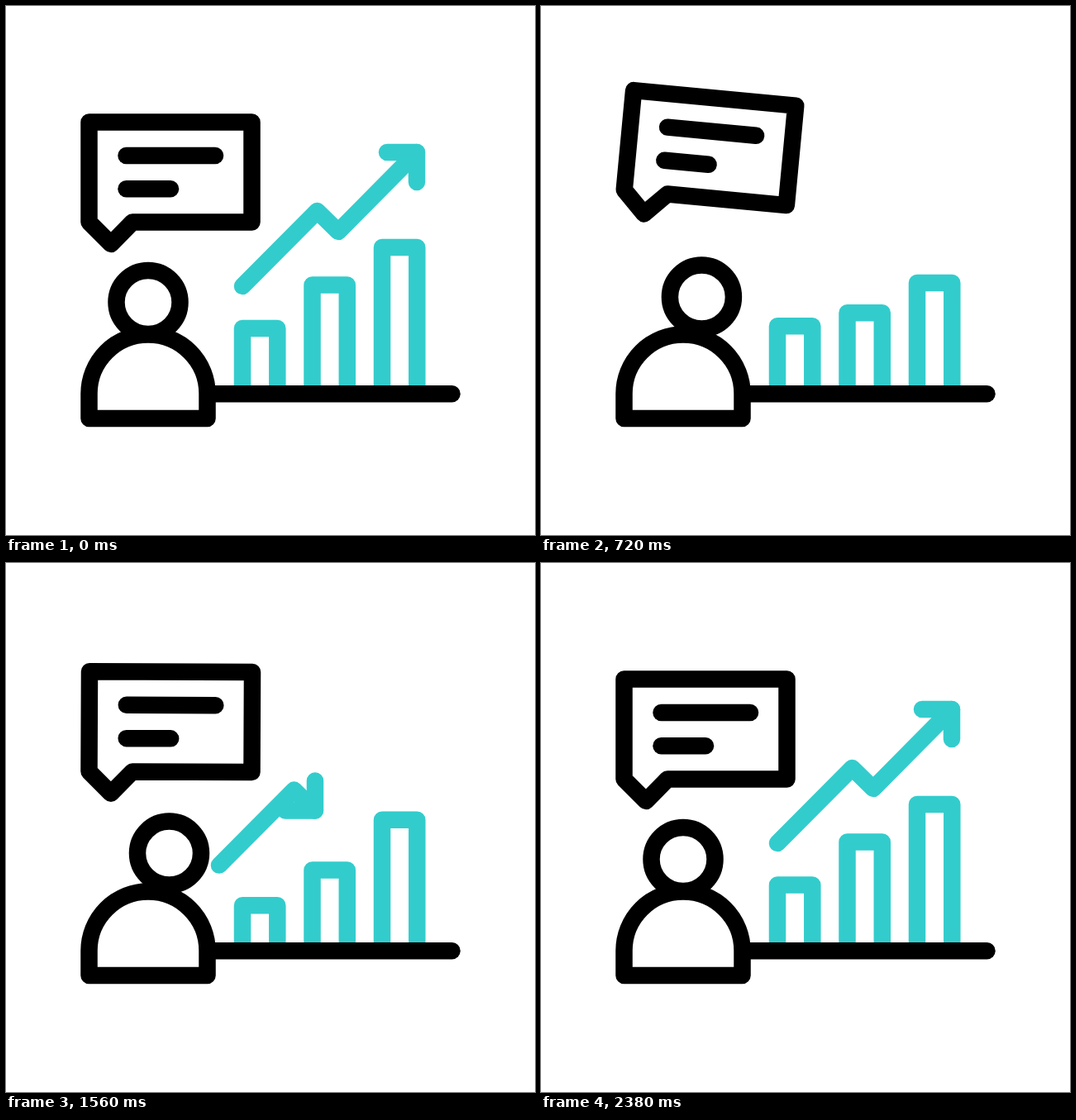
An HTML page with a canvas for the animation above (2400 ms loop, 640 px wide and 640 px high).

```html
<!DOCTYPE html>
<html>
<head>
<meta charset="utf-8">
<style>
  html, body { margin: 0; width: 100%; height: 100%; overflow: hidden; background: #fff; }
  canvas { display: block; width: 100vw; height: 100vh; }
</style>
</head>
<body>
<canvas id="stage" width="640" height="640"></canvas>
<script>
const ctx = document.getElementById('stage').getContext('2d');
const LOOP = 2400, BLACK = '#000', TEAL = '#33cccc';

const clamp = v => Math.min(1, Math.max(0, v));
const ease = (t, from, to) => (1 - Math.cos(Math.PI * clamp((t - from) / (to - from)))) / 2;

// Swings from rest through each peak, one per beat, and back to rest.
const swing = (t, beat, ...peaks) => [...peaks, 0].reduce(
  (value, peak, i) => value + (peak - value) * ease(t, i * beat, (i + 1) * beat), 0);

const shaft = [[286, 339], [376.5, 248], [402, 273], [497, 177]];
const lengths = shaft.slice(1).map(([x, y], i) => Math.hypot(x - shaft[i][0], y - shaft[i][1]));
const total = lengths.reduce((a, b) => a + b);

function pointAt(d) {
  let i = 0;
  while (i < lengths.length - 1 && d > lengths[i]) d -= lengths[i++];
  const [a, b] = [shaft[i], shaft[i + 1]], k = d / lengths[i];
  return [a[0] + (b[0] - a[0]) * k, a[1] + (b[1] - a[1]) * k];
}

function line(points, color, closed) {
  ctx.beginPath();
  points.forEach(p => ctx.lineTo(...p));
  if (closed) ctx.closePath();
  ctx.strokeStyle = color;
  ctx.stroke();
}

// Flies off while its tail catches up, then draws itself in from the start.
function drawArrow(t) {
  if (t > 560 && t < 1200) return;
  const leaving = t <= 560;
  const trim = leaving ? ease(t, 0, 540) : ease(t, 1200, 1880);
  const away = 1 - ease(t, 1200, 1900);
  const shift = leaving ? [79.5 * trim, -79.5 * trim] : [-59 * away, 56 * away];
  const wing = 36 * clamp((leaving ? 540 - t : t - 1200) / 140);
  const turn = leaving ? 0 : ease(trim, 0.42, 0.45) - ease(trim, 0.555, 0.585);
  const tip = leaving ? total : trim * total;

  ctx.save();
  ctx.translate(...shift);
  ctx.setLineDash([tip + 0.01, total * 2]);
  ctx.lineDashOffset = leaving ? -trim * total : 0;
  line(shaft, TEAL);
  ctx.setLineDash([]);
  ctx.translate(...pointAt(tip));
  ctx.rotate(turn * Math.PI / 2);
  line([[-wing, 0], [0, 0], [0, wing + 0.01]], TEAL);
  ctx.restore();
}

function drawBars(t) {
  [389.5, 337.5, 292].forEach((rest, i) => {
    const left = 286 + 84.5 * i, right = left + 42.3;
    const top = rest + swing(t + 30 - 160 * i, 475, 44, -30, 34);
    line([[left, 468], [left, top], [right, top], [right, 468]], TEAL);
  });
}

function drawBubble(t) {
  ctx.save();
  ctx.translate(153, 261.5 + swing(t, 360, 44, -34, 42, -18, 17));
  ctx.rotate(swing(t - 65, 325, -18.4, 5.4, -0.2, -8, 4.5) * Math.PI / 180);
  ctx.translate(-153, -261.5);
  line([[100.5, 140.5], [297.5, 140.5], [297.5, 261.5], [153, 261.5], [127, 288], [100.5, 261.5]], BLACK, true);
  line([[145.5, 181], [253, 181]], BLACK);
  line([[145.5, 221.3], [199, 221.3]], BLACK);
  ctx.restore();
}

function drawPerson(t) {
  const phase = Math.min(t, 2360 - t);
  const dx = 30 * ease(phase, 200, 900) - 3 * ease(phase, 0, 200);
  ctx.fillStyle = '#fff';
  ctx.strokeStyle = BLACK;
  ctx.beginPath();
  ctx.arc(172 + dx, 358.5 - 0.29 * dx, 38.5, 0, Math.PI * 2);
  ctx.fill();
  ctx.stroke();
  ctx.beginPath();
  ctx.moveTo(100.5, 499);
  ctx.arc(172, 469, 71.5, Math.PI, 0);
  ctx.lineTo(243.5, 499);
  ctx.closePath();
  ctx.fill();
  ctx.stroke();
}

function draw(t) {
  ctx.fillStyle = '#fff';
  ctx.fillRect(0, 0, 640, 640);
  ctx.lineWidth = 20.5;
  ctx.lineCap = ctx.lineJoin = 'round';
  drawArrow(t);
  drawBars(t);
  line([[244, 469.2], [539.5, 469.2]], BLACK);
  drawBubble(t);
  drawPerson(t);
}

const start = performance.now();
function tick() {
  draw((performance.now() - start) % LOOP);
  requestAnimationFrame(tick);
}
tick();
</script>
</body>
</html>
```
